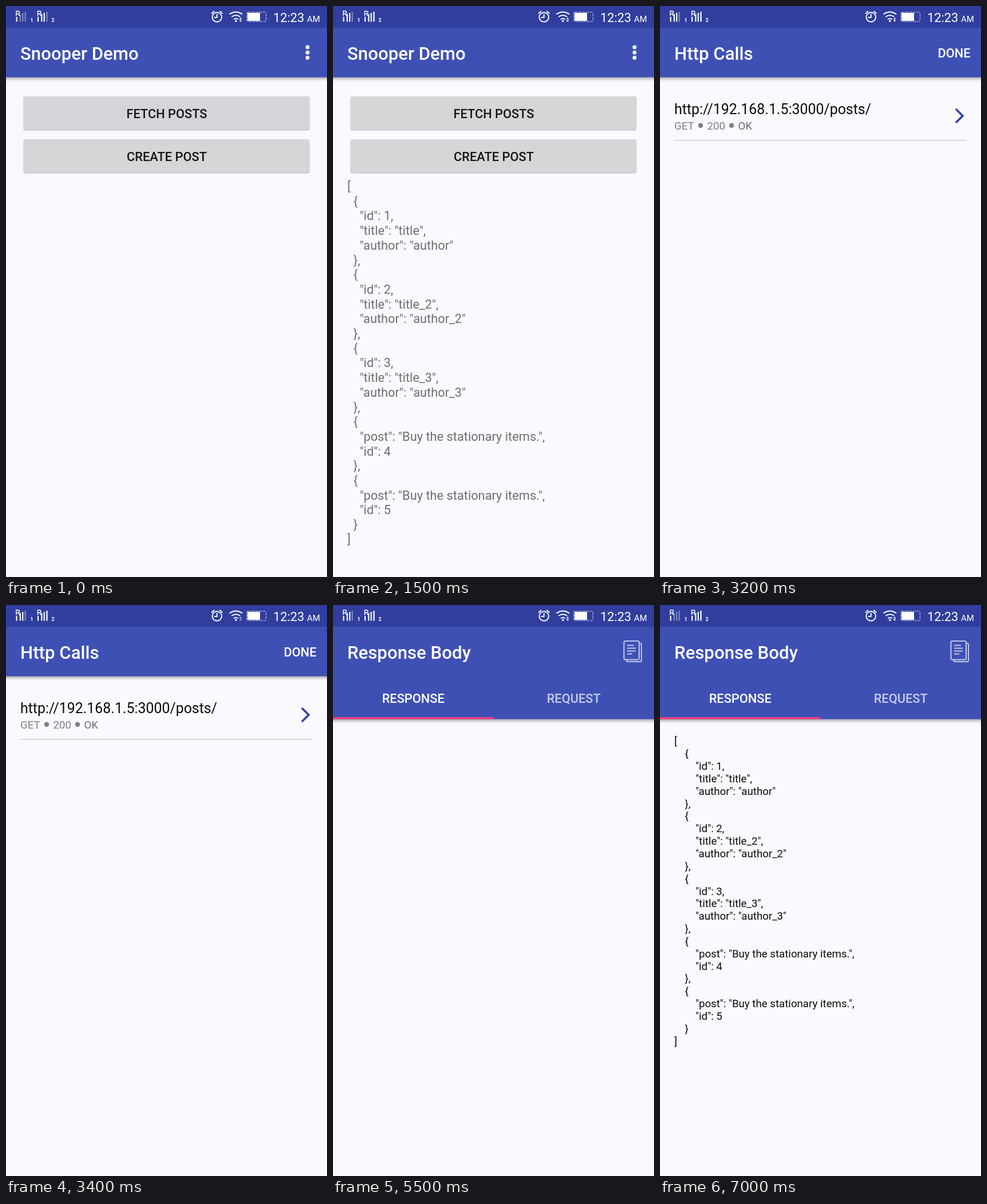
Recreate the animation shown at these times as an HTML page. Size 561x998 px, loop 8 s.

```html
<!DOCTYPE html>
<html lang="en">
<head>
<meta charset="utf-8">
<title>Snooper Demo</title>
<style>
  html, body { margin: 0; width: 100%; height: 100%; overflow: hidden; }
  body { position: relative; background: #faf9fd; font-family: Roboto, sans-serif; }
  svg { position: absolute; left: 0; top: 0; }
  text { font-family: Roboto, sans-serif; }
  pre { position: absolute; left: 25px; margin: 0; font-family: Roboto, sans-serif; }

  .title { font-size: 31.2px; font-weight: 500; fill: #fff; }
  .label { font-size: 21.8px; font-weight: 500; fill: #161617; }
  .light { fill: #fff; }
  .mid { text-anchor: middle; }
  .meta { font-size: 18.7px; fill: #7f7f84; }
  .bar { fill: #3f50b5; filter: drop-shadow(0 2px 3px rgba(0, 0, 0, .42)); }
  .button { fill: #d6d5d8; filter: drop-shadow(0 1px 1px rgba(0, 0, 0, .3)); }
  .line { fill: none; stroke: #fff; }
  .dim { opacity: .4; }

  #main-text { top: 303px; font-size: 21.8px; line-height: 25.7px; color: #6f6e71; }
  #body-text { top: 228.4px; font-size: 18.7px; line-height: 21.85px; color: #0c0c0d; }

  .timed { animation: 8s step-end infinite; }
  #home { animation-name: home; }
  #calls { animation-name: calls; }
  #detail { animation-name: detail; }
  #fetch { animation-name: press; }
  #main-text { animation-name: main-text; }
  #body-text { animation-name: body-text; }
  #paper { animation-name: paper; }
  #arrows { animation-name: arrows; }
  .sim1 { animation-name: sim1; }
  .sim2 { animation-name: sim2; }

  @keyframes home { 0% { visibility: visible } 40%, 100% { visibility: hidden } }
  @keyframes calls { 0% { visibility: hidden } 40% { visibility: visible } 68.75%, 100% { visibility: hidden } }
  @keyframes detail { 0% { visibility: hidden } 68.75%, 100% { visibility: visible } }
  @keyframes main-text { 0% { visibility: hidden } 18.75% { visibility: visible } 40%, 100% { visibility: hidden } }
  @keyframes body-text { 0% { visibility: hidden } 70%, 100% { visibility: visible } }
  @keyframes paper { 0% { fill: #f8f9fd } 15%, 100% { fill: #faf9fd } }
  @keyframes press {
    0% { fill: #d4d5d8; filter: drop-shadow(0 1px 1px rgba(0, 0, 0, .3)) }
    15% { fill: #c9c9cb; filter: drop-shadow(0 2px 3px rgba(0, 0, 0, .38)) }
    16.25%, 100% { fill: #d6d5d8; filter: drop-shadow(0 1px 1px rgba(0, 0, 0, .3)) }
  }
  @keyframes arrows { 0% { opacity: 1 } 42.5% { opacity: .6 } 55%, 100% { opacity: 1 } }
  @keyframes sim1 { 0% { opacity: .4 } 18.75% { opacity: 1 } 85%, 100% { opacity: .4 } }
  @keyframes sim2 { 0% { opacity: .4 } 18.75%, 100% { opacity: 1 } }
</style>
</head>
<body>
<svg width="561" height="998" viewBox="0 0 561 998">
  <rect id="paper" class="timed" width="561" height="998"/>

  <g id="home" class="timed">
    <rect class="bar" x="-10" y="30" width="581" height="94.5"/>
    <text class="title" x="25" y="94">Snooper Demo</text>
    <g fill="#fff">
      <circle cx="527" cy="72" r="3.4"/>
      <circle cx="527" cy="81.3" r="3.4"/>
      <circle cx="527" cy="90.5" r="3.4"/>
    </g>
    <rect id="fetch" class="button timed" x="31" y="158" width="499" height="58" rx="3"/>
    <rect class="button" x="31" y="233" width="499" height="58" rx="3"/>
    <text class="label mid" x="281" y="196">FETCH POSTS</text>
    <text class="label mid" x="281" y="271">CREATE POST</text>
  </g>

  <g id="calls" class="timed">
    <rect class="bar" x="-10" y="30" width="581" height="94.5"/>
    <text class="title" x="25" y="94">Http Calls</text>
    <text class="label light" x="542.5" y="90" text-anchor="end">DONE</text>
    <text x="25" y="189" font-size="24.9" fill="#0c0c0d">http://192.168.1.5:3000/posts/</text>
    <g class="meta">
      <text x="25" y="216">GET</text>
      <circle cx="71" cy="208.7" r="4.3"/>
      <text x="82.5" y="216">200</text>
      <circle cx="125" cy="208.7" r="4.3"/>
      <text x="136.5" y="216" fill="#6c6c70">OK</text>
    </g>
    <path d="M517 180L529 192L517 204" fill="none" stroke="#3443a4" stroke-width="3.6"/>
    <rect x="25" y="234" width="511" height="1.6" fill="#d3d2d6"/>
  </g>

  <g id="detail" class="timed">
    <rect class="bar" x="-10" y="30" width="581" height="169.5"/>
    <text class="title" x="25" y="94">Response Body</text>
    <g class="line" stroke-width="2" opacity=".68">
      <rect x="508.5" y="63" width="26.5" height="32.5" rx="2.5"/>
      <path d="M536 67h1q2 0 2 2v28q0 2-2 2h-21q-3 0-3-3"/>
      <path d="M514 70.5h12M514 75.5h15M514 80.5h15M514 85.5h9"/>
    </g>
    <text class="label light mid" x="140.3" y="171">RESPONSE</text>
    <text class="label light mid" x="420.7" y="171" opacity=".7">REQUEST</text>
    <rect y="196" width="280.5" height="3.5" fill="#f43d7c"/>
  </g>

  <rect width="561" height="38" fill="#313e9e"/>
  <g fill="#fff">
    <g id="signals"></g>
    <text x="42.5" y="28" font-size="9" font-weight="700">1</text>
    <text x="79.5" y="28" font-size="9" font-weight="700">2</text>

    <g class="line" stroke-width="1.9">
      <circle cx="368.7" cy="19.5" r="8.3"/>
      <path d="M359 13.2l5-4.4M378.4 13.2l-5-4.4M368.7 14v6h-5"/>
    </g>
    <g class="line" stroke-width="2">
      <path d="M390.5 14.5q11.3-8 22.6 0M394.3 19q7.5-5.3 15 0M398 23.3q3.8-2.7 7.6 0"/>
    </g>
    <circle cx="401.8" cy="26.3" r="1.7"/>
    <path id="arrows" class="timed" d="M407.5 23.3h5l-2.5-3zM407.5 24.7h5l-2.5 3z"/>
    <rect class="line" x="420.8" y="10.8" width="33.6" height="16.4" rx="2" stroke-dasharray="5 1.5" opacity=".75"/>
    <rect x="422" y="12" width="22" height="14"/>
    <text x="467" y="27.5" font-size="21.8">12:23</text>
    <text x="526" y="27.5" font-size="15">AM</text>
  </g>
</svg>
<pre id="main-text" class="timed"></pre>
<pre id="body-text" class="timed"></pre>

<script>
  const posts = [
    { id: 1, title: "title", author: "author" },
    { id: 2, title: "title_2", author: "author_2" },
    { id: 3, title: "title_3", author: "author_3" },
    { post: "Buy the stationary items.", id: 4 },
    { post: "Buy the stationary items.", id: 5 }
  ];
  const show = (id, indent) => {
    document.getElementById(id).textContent = JSON.stringify(posts, null, indent);
  };
  show("main-text", 2);
  show("body-text", 4);

  // One antenna: a small R above four rising bars, each with its own class.
  const antenna = (x, classes) => `<g transform="translate(${x})">
    <path class="line" stroke-width="1.4" d="M1 17.5V9h3q2.5 0 2.5 2.2T4 13.5H1M4 13.5l3 4"/>` +
    classes.map((c, i) => {
      const top = [19, 14, 12, 10][i];
      return `<rect class="${c}" x="${[0.5, 6.8, 11.2, 15.6][i]}" y="${top}" width="2.1" height="${27.5 - top}"/>`;
    }).join("") + "</g>";
  document.getElementById("signals").innerHTML =
    antenna(17, ["", "timed sim1", "timed sim1", "dim"]) +
    antenna(54.5, ["", "", "", "timed sim2"]);
</script>
</body>
</html>
```
